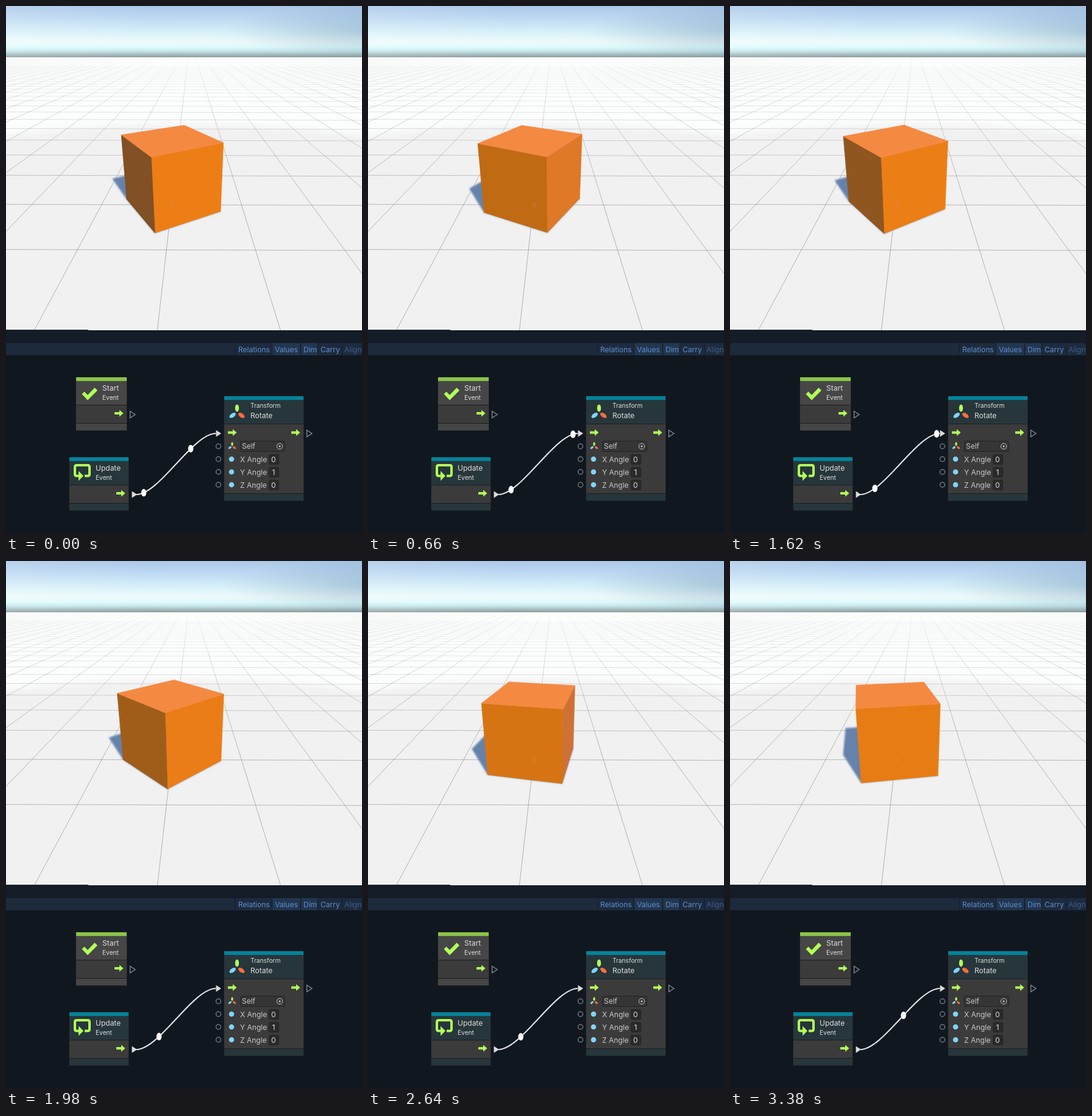
Write an HTML page that moves like this. It is 584 px wide and 863 px high and loops after 3.44 s.

```html
<!DOCTYPE html>
<html lang="en">
<head>
<meta charset="utf-8">
<title>Rotate graph</title>
<style>
  html, body { margin: 0; width: 100%; height: 100%; overflow: hidden; background: #10171f; }
  svg { display: block; width: 584px; height: 863px; }
  text { font: 12px Inter, Roboto, sans-serif; fill: #dedede; }
  .small { font-size: 10.2px; }
  .dim { fill: #c8c8c8; }
  .tool { fill: #5f8dcb; }
  .lime { fill: #b2ff59; }
</style>
</head>
<body>
<svg viewBox="0 0 584 863" xmlns="http://www.w3.org/2000/svg">
  <defs>
    <linearGradient id="sky" x1="0" y1="0" x2="0" y2="1">
      <stop offset="0" stop-color="#abc8e9"/>
      <stop offset=".25" stop-color="#bfdaf3"/>
      <stop offset=".45" stop-color="#d2ecf8"/>
      <stop offset=".6" stop-color="#e2f7fb"/>
      <stop offset=".7" stop-color="#effafa"/>
      <stop offset=".8" stop-color="#defcfd"/>
      <stop offset=".88" stop-color="#c6e6e9"/>
      <stop offset=".95" stop-color="#a3b8ba"/>
      <stop offset="1" stop-color="#8d9b9a"/>
    </linearGradient>
    <linearGradient id="side">
      <stop offset="0" stop-color="#fff" stop-opacity=".14"/>
      <stop offset=".4" stop-color="#fff" stop-opacity="0"/>
      <stop offset="1" stop-color="#5f86a8" stop-opacity=".1"/>
    </linearGradient>
    <radialGradient id="dusk">
      <stop offset="0" stop-color="#5f86a8" stop-opacity=".3"/>
      <stop offset="1" stop-color="#5f86a8" stop-opacity="0"/>
    </radialGradient>
    <linearGradient id="line" gradientUnits="userSpaceOnUse" x1="0" y1="84" x2="0" y2="330">
      <stop offset="0" stop-color="#9a9f9c" stop-opacity=".04"/>
      <stop offset=".25" stop-color="#9a9f9c" stop-opacity=".3"/>
      <stop offset=".65" stop-color="#9a9d9a" stop-opacity=".6"/>
      <stop offset="1" stop-color="#999c99" stop-opacity=".75"/>
    </linearGradient>
    <filter id="soft" x="-20%" y="-20%" width="140%" height="140%"><feGaussianBlur stdDeviation="1.8"/></filter>
    <filter id="haze" x="-10%" y="-20%" width="120%" height="140%"><feGaussianBlur stdDeviation="6"/></filter>
    <clipPath id="view"><rect y="84" width="584" height="447"/></clipPath>
    <clipPath id="air"><rect width="584" height="84"/></clipPath>
    <g id="arrow" class="lime"><path d="M-7 -2H1V-5.5L7.5 0L1 5.5V2H-7Z"/></g>
    <path id="port" d="M-4 -5.5L4.5 0L-4 5.5Z"/>
    <g id="axes">
      <ellipse cy="-6.5" rx="3.2" ry="6" fill="#b2ff59"/>
      <ellipse cy="-9" rx="3.2" ry="6" fill="#ff6e40" transform="rotate(126)"/>
      <ellipse cy="-9" rx="3.2" ry="6" fill="#81d4fa" transform="rotate(-126)"/>
    </g>
  </defs>

  <rect width="584" height="84" fill="url(#sky)"/>
  <rect width="584" height="84" fill="url(#side)"/>
  <ellipse cx="600" cy="40" rx="240" ry="42" fill="url(#dusk)" clip-path="url(#air)"/>
  <g clip-path="url(#view)">
    <rect y="84" width="584" height="447" fill="#f1f1f1"/>
    <path d="M-30 70H614V216Q300 172 -30 216Z" fill="#fcfdfd" filter="url(#haze)"/>
    <g id="grid" fill="none"></g>
    <g id="shadow" fill="#6582ab" filter="url(#soft)"></g>
  </g>
  <g id="cube"></g>
  <circle cx="273" cy="326" r="4" fill="#e98a70" opacity=".15"/>

  <rect y="531" width="584" height="332" fill="#10171f"/>
  <rect y="531" width="584" height="21" fill="#141c28"/>
  <rect y="530" width="135" height="1" fill="#2a313b"/>
  <rect y="552" width="584" height="20" fill="#1d2a3c"/>
  <g id="tools"></g>
  <g id="nodes"></g>

  <use href="#port" x="207.5" y="669" fill="none" stroke="#858b92" stroke-width="1.3"/>
  <use href="#port" x="497.5" y="700" fill="none" stroke="#858b92" stroke-width="1.3"/>
  <path d="M214 800C251 800 307 700 344 700" fill="none" stroke="#e3e5e7" stroke-width="2"/>
  <use href="#port" x="210.5" y="800" fill="#dcdcdc"/>
  <use href="#port" x="348.5" y="700" fill="#dcdcdc"/>
  <g id="drops" fill="#fff"></g>

  <path class="lime" d="M124.500 635.500L128.500 631.500L134 637L145.500 625L150 629.500L134 645.500Z"/>
  <path d="M119 769.500H116Q113 769.500 113 766.500V755Q113 752 116 752H134Q137 752 137 755V766.500Q137 769.500 134 769.500H129" fill="none" stroke="#b2ff59" stroke-width="4"/>
  <path class="lime" d="M119 761.500L127 769.500L119 777.500Z"/>
  <use href="#axes" x="379" y="665"/>
  <use href="#arrow" x="185" y="667"/>
  <use href="#arrow" x="188" y="798"/>
  <use href="#arrow" x="371" y="698.500"/>
  <use href="#arrow" x="475" y="698.500"/>

  <text x="158" y="630">Start</text><text class="small" x="158" y="645">Event</text>
  <text x="147" y="761">Update</text><text class="small" x="147" y="776">Event</text>
  <text class="small" x="401" y="658">Transform</text><text x="401" y="675">Rotate</text>
  <use href="#axes" transform="translate(371 720.500) scale(.5)"/>
  <rect x="384.500" y="712.500" width="73" height="17" rx="2" fill="#353535" stroke="#232323"/>
  <text class="dim" x="387" y="725">Self</text>
  <circle cx="449" cy="721" r="4.700" fill="none" stroke="#c4c4c4"/>
  <circle cx="449" cy="721" r="1.600" fill="#c4c4c4"/>
  <circle cx="348.500" cy="721" r="4" fill="none" stroke="#6f757b" stroke-width="1.500"/>
  <g id="inputs"></g>
</svg>

<script>
const $ = id => document.getElementById(id);
const NS = 'http://www.w3.org/2000/svg';
function add(parent, tag, attrs, text) {
  const el = document.createElementNS(NS, tag);
  for (const k in attrs) el.setAttribute(k, attrs[k]);
  if (text) el.textContent = text;
  return parent.appendChild(el);
}
const rect = (g, x, y, w, h, fill) => add(g, 'rect', { x, y, width: w, height: h, fill });

// Ground grid in perspective
const VX = 302, VY = 55, ROW_HORIZON = 57.5;
for (let n = -22; n <= 22; n++) {
  const x = y => VX + (201.5 * n - 53.5) * (y - VY) / 475;
  add($('grid'), 'path', { d: `M${x(84)} 84L${x(531)} 531`, stroke: 'url(#line)' });
}
for (let n = -1; n < 26; n++) {
  const y = ROW_HORIZON + 1 / (0.00373 + 0.000806 * n);
  const fade = Math.min(0.7, Math.max(0.06, (y - 84) / 330));
  add($('grid'), 'path', { d: `M0 ${y - 0.8}L584 ${y + 0.8}`, stroke: '#999c99', 'stroke-opacity': fade });
}

// Toolbar
[['Relations', 377, 59, 0], ['Values', 437, 45, 1], ['Dim', 484, 27, 1], ['Carry', 512, 39, 0], ['Align', 552, 32, 0]]
  .forEach(([label, x, w, on]) => {
    rect($('tools'), x, 552, w, 20, on ? '#22364f' : '#1d2b3f');
    rect($('tools'), x - 1, 552, 1, 20, '#141d2a');
    const t = add($('tools'), 'text', { x: x + 4, y: 567, class: 'tool' }, label);
    if (label === 'Align') { t.setAttribute('opacity', 0.5); t.setAttribute('x', 555); }
  });

// Node boxes: x, y, width, header end, body end, bottom, bar, header
[[115, 608, 83, 653, 683, 695, '#8bc34a', '#464646'],
 [104, 739, 97, 784, 814, 826, '#04839a', '#27363b'],
 [358, 639, 130, 684, 798, 810, '#04839a', '#27363b']]
  .forEach(([x, y, w, a, b, end, bar, head]) => {
    const g = $('nodes');
    add(g, 'rect', { x: x - 1, y: y - 1, width: w + 2, height: end - y + 2, rx: 2, fill: '#1a1e22' });
    rect(g, x, y, w, 6.5, bar);
    rect(g, x, y + 6.5, w, a - y - 6.5, head);
    rect(g, x, a + 1, w, b - a - 1, '#3b3b3b');
    rect(g, x, b + 1, w, end - b - 1, head);
  });

['X', 'Y', 'Z'].forEach((axis, i) => {
  const y = 742 + 21 * i, g = $('inputs');
  add(g, 'circle', { cx: 348.5, cy: y, r: 4, fill: 'none', stroke: '#6f757b', 'stroke-width': 1.5 });
  add(g, 'circle', { cx: 370, cy: y, r: 4.3, fill: '#81d4fa' });
  add(g, 'text', { x: 384, y: y + 5, class: 'dim' }, axis + ' Angle');
  add(g, 'rect', { x: 431.5, y: y - 7.5, width: 16, height: 16, rx: 2, fill: '#2a2a2a', stroke: '#222' });
  add(g, 'text', { x: axis === 'Y' ? 436.5 : 435, y: y + 5 }, axis === 'Y' ? '1' : '0');
});

// Moving parts
const shades = Array.from({ length: 5 }, () => add($('shadow'), 'polygon', {}));
const faces = Array.from({ length: 5 }, () => add($('cube'), 'polygon', { 'stroke-width': 0.6, 'stroke-linejoin': 'round' }));
const drops = [0, 1].map(() => add($('drops'), 'ellipse', { rx: 4.3, ry: 6.2 }));

const LOOP = 3440, STEP = 73.7, LAST = 46;
const KEYS = [0, 9, 17, 22, 31, 41, 46];
const TURN = [14.1, 163.3, 289.6, 368.7, 517.3, 676.2, 755.3];
const FLOW = [0.103, 1.693, 3.143, 3.996, 5.546, 7.203, 8.14];
const GAP = 0.76, FIRST_GAP = 0.571;

function sample(values, n) {
  let i = 0;
  while (i < KEYS.length - 2 && n >= KEYS[i + 1]) i++;
  return values[i] + (values[i + 1] - values[i]) * (n - KEYS[i]) / (KEYS[i + 1] - KEYS[i]);
}

function project([x, z], top) {
  const q = (top ? 4.369 : 4.755) + z;
  return [VX + 541 * (x - 0.262) / q, VY + 580 * (top ? 1.222 : 2.222) / q];
}
const points = list => list.map(p => p.map(v => v.toFixed(2)).join()).join(' ');
const area = p => p.reduce((s, [x, y], i) => {
  const [u, v] = p[(i + 1) % p.length];
  return s + x * v - u * y;
}, 0);

function paint(el, pts, color) {
  el.setAttribute('points', points(pts));
  el.setAttribute('fill', color);
  el.setAttribute('stroke', color);
}

function faceColor(a) {
  const lit = Math.max(0, 0.321 * Math.sin(a) - 0.557 * Math.cos(a));
  return `rgb(${[Math.sqrt(16000 + 62000 * lit), Math.sqrt(6300 + 14900 * lit), 20 + 40 * Math.sin(a) ** 6].map(Math.round)})`;
}

function drawCube(deg) {
  const angles = [0, 1, 2, 3].map(i => (deg + 90 * i) * Math.PI / 180);
  const corners = angles.map(a => [Math.SQRT1_2 * Math.sin(a), Math.SQRT1_2 * Math.cos(a)]);
  const top = corners.map(c => project(c, true));
  const base = corners.map(c => project(c, false));
  const cast = corners.map(([x, z]) => project([x - 0.385, z + 0.73], false));
  angles.forEach((a, i) => {
    const j = (i + 1) % 4;
    const side = [top[i], top[j], base[j], base[i]];
    const hidden = area(side) > 0;
    faces[i].setAttribute('visibility', hidden ? 'hidden' : 'visible');
    paint(faces[i], side, faceColor(a + Math.PI / 4));
    shades[i].setAttribute('points', points([cast[i], cast[j], base[j], base[i]]));
  });
  paint(faces[4], top, '#f48942');
  shades[4].setAttribute('points', points(cast));
}

function drawDrops(flow) {
  const tail = flow % GAP;
  const lead = tail + (flow < GAP ? FIRST_GAP : GAP);
  [tail, lead].forEach((u, i) => {
    const v = 1 - u, s = u * u * (3 - 2 * u);
    drops[i].setAttribute('cx', 214 + 111 * u * v * v + 279 * u * u * v + 130 * u ** 3);
    drops[i].setAttribute('cy', 800 - 100 * s);
    drops[i].setAttribute('visibility', u <= 1 ? 'visible' : 'hidden');
  });
}

let shown = -1;
function tick() {
  const t = performance.now() % LOOP;
  let n = LAST;
  while (n > 0 && Math.floor(n * STEP / 20) * 20 > t) n--;
  if (n !== shown) {
    shown = n;
    drawCube(sample(TURN, n));
    drawDrops(sample(FLOW, n));
  }
  requestAnimationFrame(tick);
}
tick();
</script>
</body>
</html>
```
